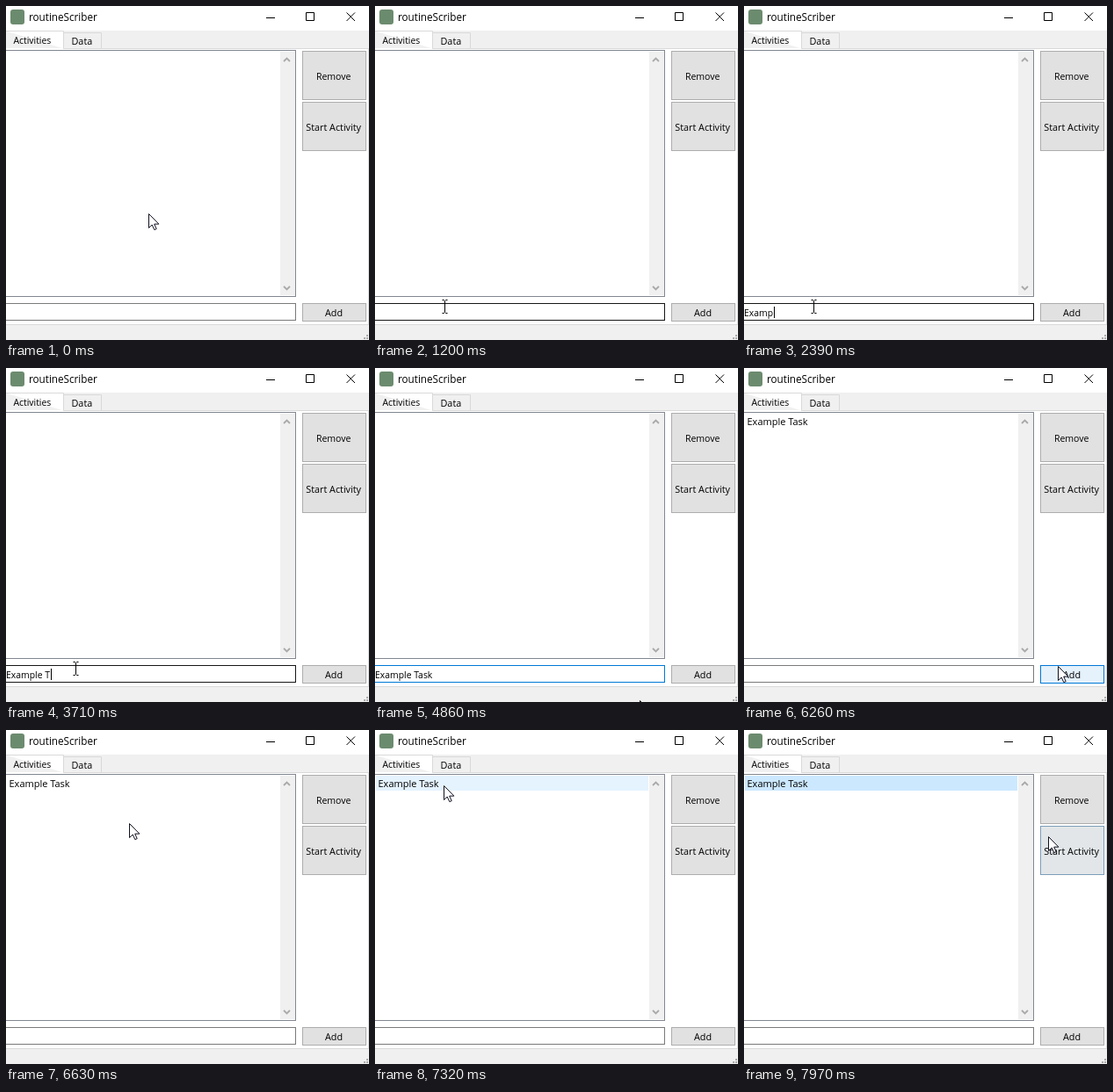
Write an HTML page that moves like this. It is 413 px wide and 380 px high and loops after 8000 ms.

```html
<!DOCTYPE html>
<html lang="en">
<head>
<meta charset="utf-8">
<title>routineScriber</title>
<style>
  html, body { margin: 0; width: 100%; height: 100%; overflow: hidden; background: #fff; }
  svg { display: block; width: 413px; height: 380px; }
  text { font: 10.8px "Open Sans", "Noto Sans", sans-serif; fill: #000; white-space: pre; }
  .mid { text-anchor: middle; }
  .line { fill: none; stroke: #d9d9d9; }
  .btn { fill: #e1e1e1; stroke: #adadad; }
  .glyph { fill: none; stroke: #000; }
  .arrow { fill: none; stroke: #aaa; stroke-width: 1.8; }
</style>
</head>
<body>
<svg viewBox="0 0 413 380">
  <!-- title bar -->
  <rect width="413" height="380" fill="#fff"/>
  <rect x="5" y="4" width="16" height="17" rx="3" fill="#6b8b6e"/>
  <text x="26" y="17" style="font-size:11.7px">routineScriber</text>
  <path class="glyph" d="M296 13.5h10M341.5 7.5h9v9h-9zM387.5 7.5l9.5 9.5M397 7.5l-9.5 9.5"/>

  <!-- tabs and page -->
  <rect y="28" width="413" height="21" fill="#f0f0f0"/>
  <path class="line" d="M65.5 30.5h43v18M65 48.5h348M412.5 49v313"/>
  <path class="line" d="M0 28.5h65.5v20" style="fill:#fff"/>
  <rect y="48" width="65" height="2" fill="#fff"/>
  <text x="8.5" y="43" style="font-size:10.4px">Activities</text>
  <text x="74.5" y="44">Data</text>

  <!-- activity list -->
  <rect x="-2.5" y="50.5" width="332" height="280" fill="#fff" stroke="#828790"/>
  <rect x="312" y="52" width="17" height="277" fill="#f0f0f0"/>
  <path class="arrow" d="M316 63l3.5-3.5 3.5 3.5M316 319l3.5 3.5 3.5-3.5"/>
  <rect id="row" x="1" y="52" width="310" height="17"/>
  <text id="item" x="3.5" y="65" style="font-size:11px">Example Task</text>

  <!-- entry field -->
  <rect id="field" x="-2.5" y="338.5" width="332" height="19" fill="#fff"/>
  <text id="entry" x="0" y="353" style="font-size:10.4px"></text>
  <rect id="caret" y="342" width="1" height="13"/>

  <!-- buttons -->
  <rect class="btn" x="337.5" y="51.5" width="72" height="55"/>
  <rect class="btn" id="start" x="337.5" y="109.5" width="72" height="55"/>
  <rect class="btn" id="add" x="337.5" y="338.5" width="72" height="20"/>
  <text class="mid" x="372.7" y="84" style="font-size:10.5px">Remove</text>
  <text class="mid" x="372.7" y="142">Start Activity</text>
  <text class="mid" x="373" y="353">Add</text>

  <!-- status bar -->
  <rect y="362" width="413" height="18" fill="#f0f0f0"/>
  <path class="line" d="M0 362.5h413"/>
  <path fill="#aaa" d="M407 377h2v2h-2zM410 377h2v2h-2zM410 374h2v2h-2z"/>

  <path id="pointer" d="M.5 .5v16l3.7-3.5 2.6 5.6 2.4-1-2.5-5.5h5.2z" fill="#fff" stroke="#101020"/>
  <path id="beam" class="glyph" d="M-2.5 -7.5h2l1 1 1-1h2M.5-6.5v13M-2.5 7.5h2l1-1 1 1h2"/>
</svg>
<script>
const LOOP = 8000;
const $ = id => document.getElementById(id);
const [row, item, field, entry, caret, start, add, pointer, beam] =
  ['row', 'item', 'field', 'entry', 'caret', 'start', 'add', 'pointer', 'beam'].map($);

// Pointer legs: start, end, destination, optional bend point
const legs = [
  [430, 1180, [79, 342]],
  [4480, 5270, [362, 346], [398, 412]],
  [5270, 5330, [366, 348]],
  [6210, 6640, [140, 106]],
  [6640, 6940, [108, 84]],
  [7110, 7350, [77, 62]],
  [7510, 7960, [346, 121]]
];

// Keystrokes; '<' is backspace
const keys = 'Exampe<le Task';
const keyTimes = [1650, 1880, 2080, 2210, 2390, 2640, 2930, 3130, 3220, 3310, 3710, 3830, 4030, 4130];

const FOCUS = 1400, PRESS = 5520, RELEASE = 5700, SELECT = 7510;
const ramp = (t, a, b) => Math.min(1, Math.max(0, (t - a) / (b - a)));
const smooth = u => u * u * (3 - 2 * u);
const mix = (a, b, u) => a.map((v, i) => v + (b[i] - v) * u);
const rgb = c => `rgb(${c.map(Math.round)})`;

function pointerAt(t) {
  let pos = [162, 236];
  for (const [t0, t1, to, bend] of legs) {
    if (t < t0) break;
    const u = smooth(ramp(t, t0, t1));
    pos = bend ? mix(mix(pos, bend, u), mix(bend, to, u), u) : mix(pos, to, u);
  }
  return pos.map(Math.round);
}

function typedAt(t) {
  let s = '', last = FOCUS;
  keyTimes.forEach((k, i) => {
    if (t < k) return;
    s = keys[i] === '<' ? s.slice(0, -1) : s + keys[i];
    last = k;
  });
  return [s, last];
}

function paintButton(el, hover, press = 0) {
  el.style.fill = rgb(mix(mix([225, 225, 225], [229, 241, 251], hover), [204, 228, 247], press));
  el.style.stroke = rgb(mix(mix([173, 173, 173], [0, 120, 215], hover), [0, 84, 153], press));
}

const show = (el, on) => el.setAttribute('visibility', on ? 'visible' : 'hidden');

function draw(t) {
  const [x, y] = pointerAt(t);
  const overField = x < 330 && y >= 338 && y < 358;
  const focused = t >= FOCUS && t < PRESS;
  const added = t >= RELEASE;

  pointer.setAttribute('transform', `translate(${x} ${y})`);
  beam.setAttribute('transform', `translate(${x} ${y})`);
  show(pointer, !overField);
  show(beam, overField);

  field.setAttribute('stroke', overField ? '#171717' : focused ? '#0078d7' : '#7a7a7a');
  const [text, last] = typedAt(t);
  entry.textContent = added ? '' : text;
  const width = text ? entry.getComputedTextLength() : 0;
  caret.setAttribute('x', Math.max(2, Math.floor(1.5 + width)));
  show(caret, focused && (t - last) % 1060 < 530);

  show(item, added);
  const overRow = added && x < 311 && y >= 52 && y < 69;
  row.setAttribute('fill', t >= SELECT ? '#cce8ff' : overRow ? '#e5f3ff' : 'none');

  paintButton(add, ramp(t, 5160, 5400) - ramp(t, 6260, 6500),
    ramp(t, PRESS, 5660) - ramp(t, RELEASE, 5930));
  paintButton(start, ramp(t, 7900, 8150));
}

function tick(now) {
  draw(now % LOOP);
  requestAnimationFrame(tick);
}
draw(0);
requestAnimationFrame(tick);
</script>
</body>
</html>
```
